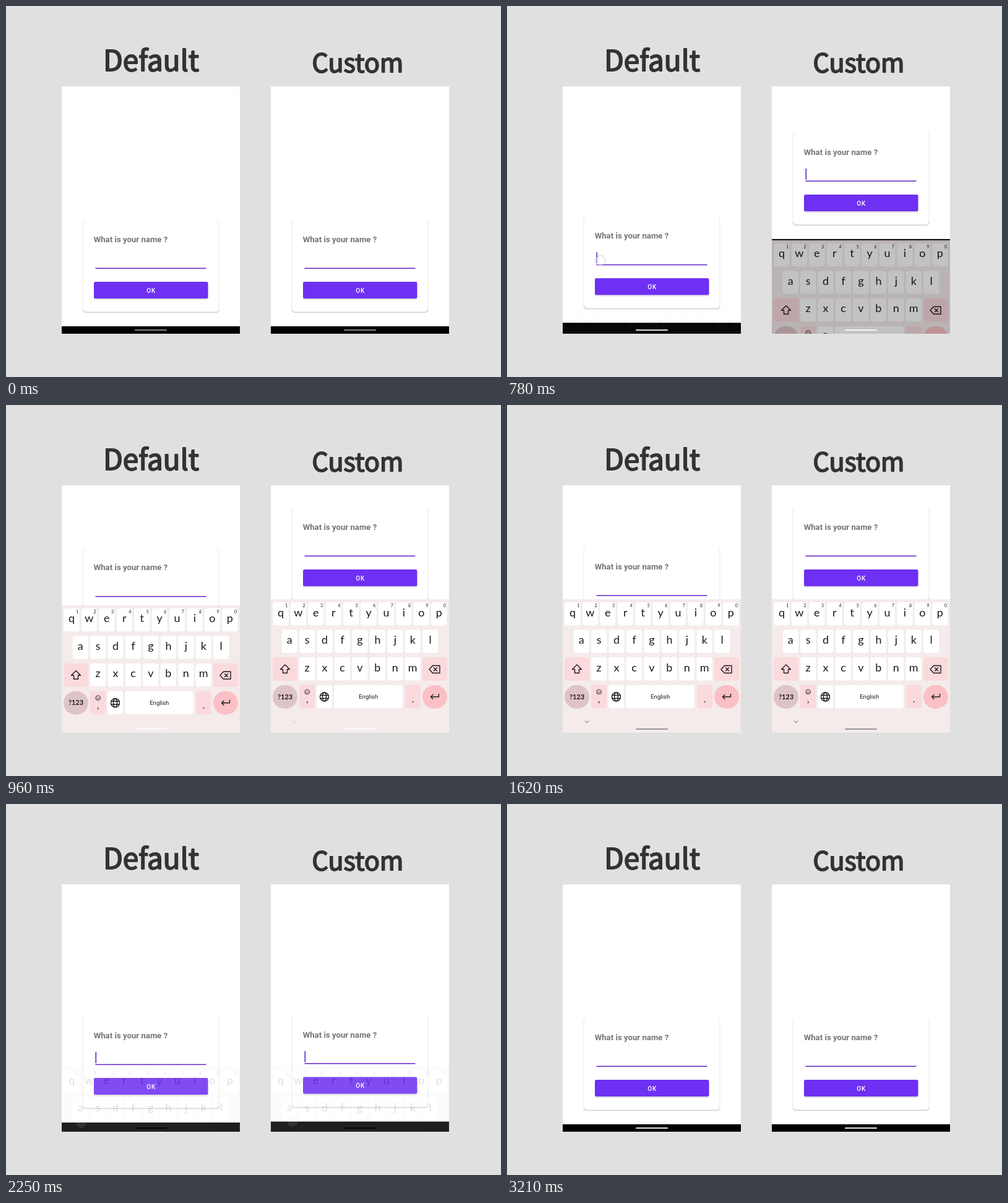
Write an HTML page that moves like this. It is 800 px wide and 600 px high and loops after 3.45 s.

```html
<!DOCTYPE html>
<html lang="en">
<head>
<meta charset="utf-8">
<title>Keyboard animation: default and custom</title>
<style>
  html, body { margin: 0; width: 100%; height: 100%; overflow: hidden; background: #e0e0e0; }
  svg { display: block; width: 800px; height: 600px; }
  .title { font-family: "Noto Sans CJK JP", "Noto Sans CJK SC", "Noto Sans CJK", Lato, sans-serif;
    fill: #333; stroke: #333; stroke-width: 1.8; stroke-linejoin: round; }
  .form { font-family: Roboto, sans-serif; }
  .keys { font-family: Lato, sans-serif; fill: #1f1a1b; text-anchor: middle; }
  .icon { fill: none; stroke: #1f1a1b; stroke-width: 1.4; stroke-linejoin: round; stroke-linecap: round; }
</style>
</head>
<body>
<svg id="stage" viewBox="0 0 800 600" xmlns="http://www.w3.org/2000/svg"></svg>
<script>
const LOOP = 3450;
const PINK = '#fadadd';
const BLINK = 190;
const CLOSE_AT = 2175;

// Positions inside a panel are those of the left one; the right one is shifted.
const panels = [
  { shift: 0, lift: 116, openAt: 777, focusAt: 660,
    touches: [[151, 412, 700, 900], [122, 516, 2080, 2262]] },
  { shift: 338, lift: 180, openAt: 685, focusAt: 600,
    touches: [[150, 407, 560, 720], [125, 514, 2080, 2262]] }
];

const clamp = (v, lo = 0, hi = 1) => Math.min(hi, Math.max(lo, v));

const rect = (x, y, w, h, fill, r = 0) =>
  `<rect x="${x}" y="${y}" width="${w}" height="${h}" rx="${r}" fill="${fill}"/>`;

const label = (x, y, size, text, extra = '') =>
  `<text x="${x}" y="${y}" font-size="${size}" ${extra}>${text}</text>`;

function letterRow(letters, firstX, top, digits = '') {
  return [...letters].map((letter, i) => {
    const x = firstX + i * 28.42;
    return rect(x - 12.7, top, 25.4, 37.5, '#fff', 4) +
      label(x, top + 22.5, 18, letter) +
      (digits ? label(x + 9.2, top + 8, 7, digits[i]) : '');
  }).join('');
}

function keyboard() {
  return rect(90, 314, 288, 440, '#f5ebeb') +
    letterRow('qwertyuiop', 106, 319, '1234567890') +
    letterRow('asdfghjkl', 120.3, 363.5) +
    letterRow('zxcvbnm', 148.6, 408) +
    rect(93, 408, 40, 38, PINK, 4) + rect(335, 408, 40, 38, PINK, 4) +
    rect(93, 453, 40, 38, '#dfc4c7', 19) + rect(136, 453, 25, 37.5, PINK, 4) +
    rect(164, 453, 25, 37.5, '#fff', 4) + rect(192, 453, 111, 37.5, '#fff', 4) +
    rect(307, 453, 25, 37.5, PINK, 4) + rect(335, 453, 40, 38, '#fac0c6', 19) +
    label(113, 475.5, 11, '?123', 'font-weight="700"') +
    label(247.7, 475, 9.6, 'English', 'font-family="Roboto, sans-serif"') +
    label(148.8, 481, 15, ',') + label(319.5, 481, 15, '.') +
    `<g class="icon">
      <path d="M113 420l7.5 7.5h-4v6h-7v-6h-4z"/>
      <path d="M351.5 421.5h11.5v12h-11.5l-5.5-6zM353.5 425l5 5m0-5l-5 5"/>
      <path d="M361.5 467.5v4.5h-13m3.5-3.5l-3.5 3.5 3.5 3.5"/>
      <circle cx="176.5" cy="472" r="7"/><ellipse cx="176.5" cy="472" rx="3" ry="7"/>
      <path d="M170 469.5h13m-13 5h13"/>
      <g stroke-width=".9"><circle cx="148.6" cy="464" r="3.8"/>
      <path d="M147.2 463v.2m2.8-.2v.2m-3.2 1.8q1.8 1.6 3.6 0"/></g>
      <path class="chevron" stroke="#8f8888" stroke-width="1.1" d="M126 510.8l3 3 3-3"/>
    </g>`;
}

function page() {
  return rect(90, -100, 288, 618, '#fff') +
    `<path d="M127 347q-3 0-3 4V490q0 5 5 5H339q5 0 5-5V351q0-4-3-4" fill="none" stroke="#e8e8e8"/>
     <path d="M124.5 491q.5 4.5 5 4.5H339q4.500 0 5-4.500" fill="none" stroke="#d2d2d2" stroke-width="1.500"/>` +
    label(141.7, 382, 13.2, 'What is your name ?', 'font-weight="700" fill="#757575"') +
    rect(144.5, 423.5, 179, 1.5, '#5f25c9') +
    `<rect class="cursor" x="144.500" y="404" width="1.600" height="18" fill="#5f25c9"/>` +
    rect(142, 448, 184.5, 27.3, '#dedbe4', 3) +
    rect(142, 446, 184.5, 27, '#6e30f2', 2.5) +
    label(234.7, 463.8, 10, 'OK',
      'font-weight="500" fill="#fff" text-anchor="middle" letter-spacing=".9"');
}

const stage = document.getElementById('stage');
stage.innerHTML =
  `<defs><clipPath id="screen"><rect x="90" y="130" width="288" height="400"/></clipPath></defs>` +
  rect(0, 0, 800, 600, '#e0e0e0') +
  label(157.3, 105, 45.8, 'Default', 'class="title"') +
  label(494.5, 107, 41.4, 'Custom', 'class="title"') +
  panels.map(p => `<g class="panel" transform="translate(${p.shift})"><g clip-path="url(#screen)">
    ${rect(90, 130, 288, 400, '#000')}
    <g class="page form">${page()}</g>
    <g class="keys">${keyboard()}</g>
    <rect class="bar" x="208" y="523.2" width="52" height="1.900" rx=".9"/>
    ${p.touches.map(([x, y]) => `<circle class="touch" cx="${x}" cy="${y}" r="8.2"
      fill="#fff" fill-opacity=".45" stroke="#6a4a96" stroke-opacity=".3"/>`).join('')}
  </g></g>`).join('');

document.querySelectorAll('.panel').forEach((node, i) => {
  const find = name => node.querySelector('.' + name);
  Object.assign(panels[i], {
    page: find('page'), keys: find('keys'), cursor: find('cursor'),
    chevron: find('chevron'), bar: find('bar'), dots: node.querySelectorAll('.touch')
  });
});

// Grey level of the gesture bar over time.
const barTones = [[0, 150], [240, 255], [980, 255], [1120, 140], [2130, 140],
  [2190, 70], [2250, 0], [2290, 0], [2480, 255], [LOOP, 255]];

function barTone(t) {
  const n = barTones.findIndex(([at]) => at > t);
  const [t0, a] = barTones[n - 1], [t1, b] = barTones[n];
  return Math.round(a + (b - a) * (t - t0) / (t1 - t0));
}

// Page lift as a share of the full lift, keyboard drop in pixels, keyboard opacity.
function pose(t, openAt) {
  if (t < CLOSE_AT - 11) {
    const u = clamp((t - openAt) / 240);
    return { lift: 1 - (1 - u) ** 3, drop: 180 * (1 - u) ** 2, alpha: clamp(u * 1.9) };
  }
  const since = Math.max(0, t - CLOSE_AT);
  return {
    lift: (1 - clamp(since / 126)) ** 4,
    drop: 109 * (since / 75) ** 1.5,
    alpha: clamp(1 - (t - CLOSE_AT + 11) / 100)
  };
}

function draw(t) {
  const tone = barTone(t);
  for (const p of panels) {
    const { lift, drop, alpha } = pose(t, p.openAt);
    p.page.setAttribute('transform', `translate(0 ${-p.lift * lift})`);
    p.keys.setAttribute('transform', `translate(0 ${drop})`);
    p.keys.setAttribute('opacity', alpha);
    const blinkOn = Math.floor((t - p.focusAt) / BLINK) % 2 === 0;
    p.cursor.setAttribute('opacity', t >= p.focusAt && t < 3200 && blinkOn ? 1 : 0);
    p.chevron.setAttribute('opacity', clamp((t - p.openAt - 260) / 60));
    p.bar.setAttribute('fill', `rgb(${tone},${tone},${tone})`);
    p.touches.forEach(([, , from, to], i) =>
      p.dots[i].setAttribute('opacity', clamp(Math.min((t - from) / 40, (to - t) / 60))));
  }
}

const start = performance.now();
function tick() {
  draw((performance.now() - start) % LOOP);
  requestAnimationFrame(tick);
}
tick();
</script>
</body>
</html>
```
